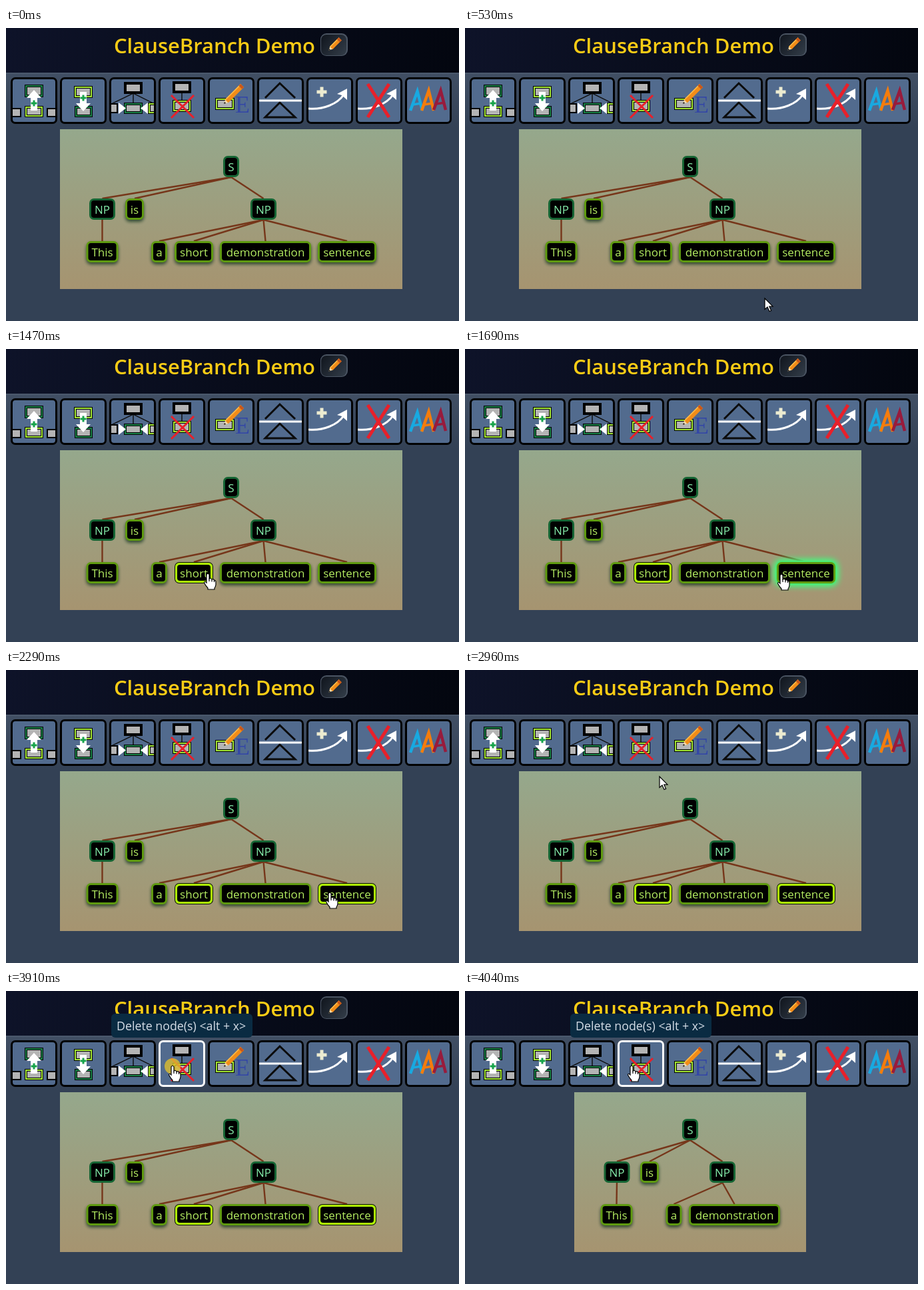
An HTML page with a canvas for the animation above (6110 ms loop, 680 by 440 pixels).

```html
<!DOCTYPE html>
<html lang="en">
<head>
<meta charset="utf-8">
<title>Syntax tree demo</title>
<style>
html, body { margin: 0; width: 100%; height: 100%; overflow: hidden; background: #334155; }
canvas { display: block; width: 680px; height: 440px; }
</style>
</head>
<body>
<canvas id="stage" width="680" height="440"></canvas>
<script>
const ctx = document.getElementById('stage').getContext('2d');
const LOOP = 6110, SANS = '"Open Sans", "Noto Sans", sans-serif';
const LIME = '#a3e635', GREEN = '#1a8047', GRAY = '#b4b4b4', RED = '#e8202a';

const HAND = new Path2D('M-2 2Q0 -1.5 2 2V8Q5 6.5 6 9Q9 8 9.5 10.5Q12 10 12 13V17Q11.5 20 10 22V24H0V22Q-3 19 -5.5 14Q-5 10.5 -2 14Z');
const FINGERS = new Path2D('M2 8V12M6 9V12.5M9.5 10.5V13');
const ARROW = new Path2D('M0 0V16.5L4 13L7 19.5L9.6 18.4L6.8 12.2H12Z');

// time, x, y, pointer shape
const moves = [
  [460, 497, 426, ARROW], [530, 450, 406, ARROW], [600, 387, 382, ARROW],
  [670, 336, 359, ARROW], [740, 303, 341, HAND], [810, 296, 332, HAND],
  [1470, 303, 337, HAND], [1540, 341, 347, HAND], [1610, 410, 349, HAND],
  [1690, 475, 338, HAND], [1820, 479, 337, HAND], [1960, 486, 334, HAND],
  [2750, 472, 322, HAND], [2820, 430, 283, ARROW], [2890, 360, 222, ARROW],
  [2960, 292, 160, ARROW], [3030, 266, 136, HAND], [3100, 255, 119, HAND],
  [3170, 250, 112, HAND]
];
const clicks = [1070, 2160, 3910];
const selectAt = { short: 1200, sentence: 2290 };
const deleteAt = 4040;

// label, centre x, top y, width, parent index
const fullTree = [
  ['S', 338, 192, 24], ['NP', 144.5, 256, 39, 0], ['is', 193, 256, 28, 0], ['NP', 386.5, 256, 39, 0],
  ['This', 144.5, 320, 48, 1], ['a', 230, 320, 24, 3], ['short', 282, 320, 58, 3],
  ['demonstration', 389.5, 320, 137, 3], ['sentence', 512, 320, 88, 3]
];
const prunedX = { This: 227.5, is: 277, a: 313.5, demonstration: 404.5 };
const prunedTree = fullTree.filter(n => !(n[0] in selectAt)).map((n, i) =>
  [n[0], i === 1 ? 228 : prunedX[n[0]] ?? n[1], ...n.slice(2)]);

function gradient(x0, y0, x1, y1, ...colors) {
  const g = ctx.createLinearGradient(x0, y0, x1, y1);
  colors.forEach((c, i) => g.addColorStop(i / (colors.length - 1), c));
  return g;
}
function rect(x, y, w, h, fill) { ctx.fillStyle = fill; ctx.fillRect(x, y, w, h); }
function round(x, y, w, h, r, fill) {
  ctx.beginPath();
  ctx.roundRect(x, y, w, h, r);
  ctx.fillStyle = fill;
  ctx.fill();
}
function poly(points, color, width, close) {
  ctx.beginPath();
  for (let i = 0; i < points.length; i += 2) ctx.lineTo(points[i], points[i + 1]);
  if (close) ctx.closePath();
  if (width) {
    ctx.strokeStyle = color;
    ctx.lineWidth = width;
    ctx.stroke();
  } else {
    ctx.fillStyle = color;
    ctx.fill();
  }
}
function text(s, x, y, font, color, align = 'center') {
  ctx.font = font;
  ctx.textAlign = align;
  ctx.fillStyle = color;
  ctx.fillText(s, x, y);
}
function plus(x, y, r, width, color) {
  poly([x - r, y, x + r, y], color, width);
  poly([x, y - r, x, y + r], color, width);
}
function cross(x, y, rx, ry, width) {
  poly([x - rx, y - ry, x + rx, y + ry], RED, width);
  poly([x + rx, y - ry, x - rx, y + ry], RED, width);
}
function box(x, y, w, h, border) {
  rect(x, y, w, h, '#000');
  if (border) rect(x + 1, y + 1, w - 2, h - 2, border);
  rect(x + 3, y + 3, w - 6, h - 6, '#000');
  rect(x + 4, y + 4, w - 8, h - 8, GRAY);
}
function plainBox(x, y, w, h) {
  rect(x, y, w, h, '#000');
  rect(x + 2, y + 2, w - 4, h - 4, GRAY);
}
function pencil(x, y, length, width) {
  ctx.save();
  ctx.translate(x, y);
  ctx.rotate(-Math.PI / 4);
  poly([0, 0, 7, -width / 2, 7, width / 2], '#f3d9a8');
  poly([0, 0, 3, -1.5, 3, 1.5], '#222');
  rect(6, -width / 2, length - 6, width, '#f28c18');
  rect(6, -width / 2, length - 6, 1.5, '#ffc04d');
  rect(length - 4, -width / 2, 4, width, '#c9571a');
  ctx.restore();
}
function curvedArrow() {
  ctx.beginPath();
  ctx.moveTo(3, 47);
  ctx.bezierCurveTo(25, 49, 47, 40, 56, 26);
  ctx.strokeStyle = '#fff';
  ctx.lineWidth = 3;
  ctx.stroke();
  poly([61, 17, 46, 25, 53, 27, 61, 34], '#fff');
}
function letterA(x, top, bottom, color) {
  poly([x, bottom, x + 10.5, top, x + 18, bottom], color, 4.5);
  poly([x + 3.5, bottom - 9, x + 17, bottom - 11], color, 3.5);
}

const icons = [
  () => {
    plainBox(1, 46, 15, 14);
    plainBox(54, 46, 15, 14);
    box(21, 11, 28, 19, GREEN);
    box(21, 43, 28, 17, LIME);
    poly([35, 19, 46, 31, 40, 31, 40, 50, 30, 50, 30, 31, 24, 31], '#fff');
    plus(35, 39, 4.5, 3, '#16a34a');
  },
  () => {
    box(21, 13, 28, 18, LIME);
    box(22, 43, 27, 17, GREEN);
    poly([35, 51, 24, 39, 30, 39, 30, 22, 40, 22, 40, 39, 46, 39], '#fff');
    plus(35, 31, 4.5, 3, '#16a34a');
  },
  () => {
    poly([3, 40, 36, 24, 68, 40], '#111', 1.5);
    poly([36, 24, 36, 40], '#111', 1.5);
    box(22, 7, 28, 18);
    box(22, 38, 28, 17, GREEN);
    plainBox(1, 39, 12, 15);
    box(58, 38, 18, 17, LIME);
    poly([14, 38, 14, 55, 25, 46.5], '#fff');
    poly([58, 38, 58, 55, 47, 46.5], '#fff');
  },
  () => {
    poly([35, 22, 35, 36], '#111', 1.5);
    box(21, 6, 28, 18);
    box(21, 34, 28, 18, LIME);
    cross(36, 44, 17, 17, 3);
  },
  () => {
    box(11, 31, 29, 18, LIME);
    text('E', 52, 53, '36px "Liberation Serif", serif', '#3447a6');
    pencil(24, 40, 39, 7);
  },
  () => {
    poly([12, 31, 34, 9, 57, 31], '#0b0b0b', 3);
    poly([12, 60, 34, 38, 57, 60], '#0b0b0b', 3, true);
    poly([3, 35, 67, 35], '#fff', 3);
  },
  () => { plus(23, 22, 7.5, 5, '#ecebd0'); curvedArrow(); },
  () => { curvedArrow(); cross(34, 35, 16, 25, 5); },
  () => {
    letterA(8, 21, 50, '#18a9e0');
    letterA(25, 20, 50, '#f57c0c');
    letterA(43, 20, 49, '#981b3c');
  }
];

function drawHeader() {
  rect(0, 0, 680, 68, gradient(0, 0, 680, 68, '#0e1329', '#080c1b', '#03060f'));
  rect(0, 67, 680, 373, gradient(0, 67, 0, 150, '#414f64', '#334155'));
  rect(0, 67, 680, 2, '#4a586c');
  text('ClauseBranch Demo', 464, 38, '600 31px ' + SANS, '#facc15', 'right');
  round(472, 8, 41, 34, 9, '#4b5563');
  round(473, 10, 38, 31, 8, gradient(473, 10, 511, 41, '#10151d', '#333d49'));
  pencil(484, 34, 25, 6);
}

function drawToolbar(hovered) {
  icons.forEach((icon, i) => {
    const x = 7 + 74 * i;
    round(x, 74, 70, 70, 7, i === hovered ? '#fff' : '#000');
    round(x + 3, 77, 64, 64, 4, '#526b8e');
    ctx.save();
    ctx.beginPath();
    ctx.rect(x + 3, 77, 64, 64);
    ctx.clip();
    ctx.translate(x, 74);
    icon();
    ctx.restore();
  });
}

function drawNode([label, cx, y, w], selected, hovered) {
  const x = cx - w / 2, leaf = !/^(S|NP)$/.test(label);
  ctx.save();
  if (hovered && !selected) {
    ctx.shadowColor = '#4af57c';
    ctx.shadowBlur = 11;
    round(x - 2, y - 2, w + 4, 36, 9, '#4ade6a');
    round(x - 1, y - 1, w + 2, 34, 8, '#4ade6a');
  } else if (leaf && !selected) {
    ctx.shadowColor = 'rgba(10,45,25,.75)';
    ctx.shadowBlur = 5;
    ctx.shadowOffsetY = 3;
  }
  round(x, y, w, 32, 7, selected ? '#0a0f05' : leaf ? '#5f9a10' : '#166534');
  ctx.restore();
  if (selected) round(x + 1, y + 1, w - 2, 30, 6, '#b0fa05');
  const inset = selected ? 4 : 3;
  round(x + inset, y + inset, w - 2 * inset, 32 - 2 * inset, 4, '#000');
  text(label, cx, y + 23, '500 17px ' + SANS, leaf ? '#b5ee62' : '#86efac');
}

function drawTree(t, pointer) {
  const pruned = t >= deleteAt;
  const tree = pruned ? prunedTree : fullTree;
  rect(pruned ? 164 : 81, 152, pruned ? 348 : 514, 240, gradient(0, 152, 0, 392, '#95a88c', '#a69470'));
  for (const [, x, y, , parent] of tree) {
    if (parent === undefined) continue;
    const [, px, py] = tree[parent];
    poly([px, py + 32, x, y], '#76361a', 2.4);
  }
  for (const node of tree) {
    const [label, cx, y, w] = node;
    const over = pointer && Math.abs(pointer[1] - cx) <= w / 2 && pointer[2] >= y && pointer[2] <= y + 32;
    drawNode(node, t >= selectAt[label], over);
  }
}

function drawPointer([, x, y, shape], clicking) {
  if (clicking) {
    ctx.beginPath();
    ctx.arc(x, y + 1, 12, 0, 2 * Math.PI);
    ctx.fillStyle = 'rgba(222,190,45,.8)';
    ctx.fill();
  }
  ctx.save();
  ctx.translate(x, y);
  ctx.fillStyle = '#fff';
  ctx.strokeStyle = '#000';
  ctx.lineWidth = 1.2;
  ctx.fill(shape);
  ctx.stroke(shape);
  if (shape === HAND) ctx.stroke(FINGERS);
  ctx.restore();
}

function render(t) {
  const pointer = moves.findLast(m => m[0] <= t);
  ctx.lineCap = 'butt';
  ctx.lineJoin = 'miter';
  drawHeader();
  drawToolbar(t >= 3030 ? 3 : -1);
  drawTree(t, pointer);
  if (t >= 3100) {
    round(158, 34, 212, 36, 6, '#0a2b42');
    text('Delete node(s) <alt + x>', 166, 59, '17.8px ' + SANS, '#d5dde7', 'left');
  }
  if (pointer) drawPointer(pointer, clicks.some(c => t >= c && t < c + 130));
}

const start = performance.now();
function tick() {
  render((performance.now() - start) % LOOP);
  requestAnimationFrame(tick);
}
tick();
</script>
</body>
</html>
```
